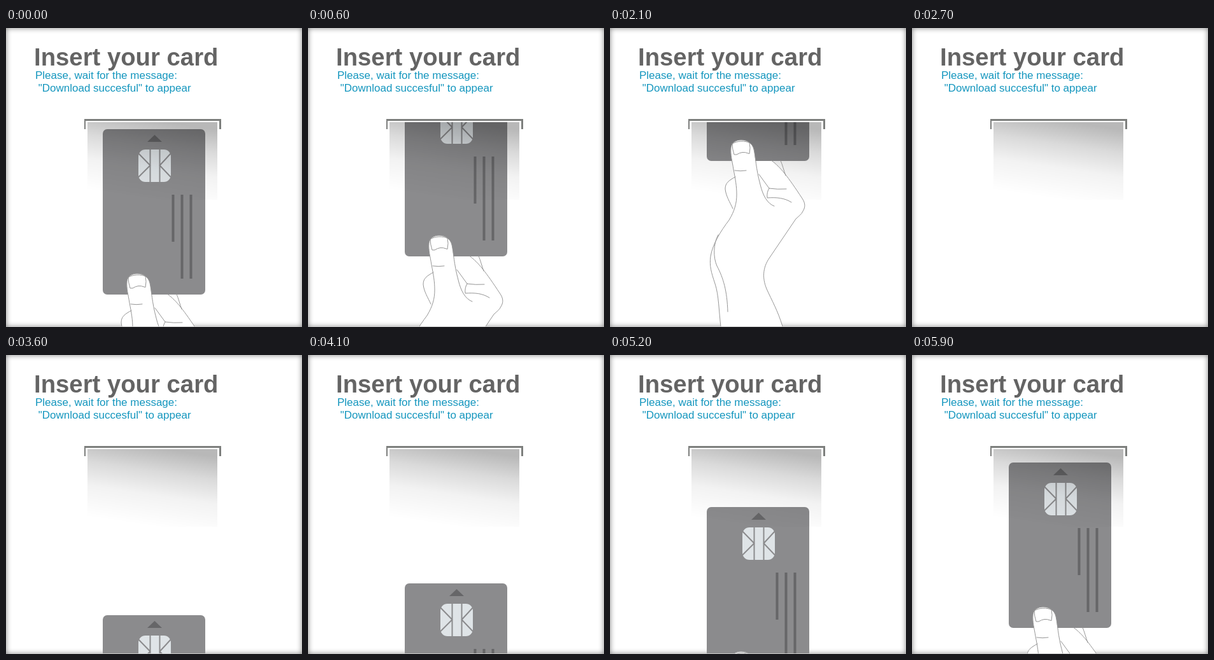
Animation, 465 px wide and 470 px high, one loop 6 s. Source, as an HTML page:

```html
<!DOCTYPE html>
<html lang="en">
<head>
<meta charset="utf-8">
<title>Insert your card</title>
<style>
  html, body { margin: 0; width: 100%; height: 100%; overflow: hidden; background: #fff; }
  .stage { position: relative; width: 465px; height: 470px; overflow: hidden; }
  .edge { position: absolute; inset: 0; box-shadow: inset 0 0 8px rgba(0, 0, 0, .5); }
  svg { position: absolute; left: 0; top: 0; display: block; }
  text { font-family: "Liberation Sans", Arial, sans-serif; white-space: pre; }
  .title { font-size: 38.3px; font-weight: bold; fill: #646464; }
  .note { font-size: 17px; fill: #1496be; }

  .move { animation: slide 6s -2ms infinite; }
  /* In by 10px steps, a blank pause, then a rise from below. */
  @keyframes slide {
    0%      { transform: translateY(0); animation-timing-function: steps(27); }
    45%     { transform: translateY(-270px); animation-timing-function: step-end; }
    45.001% { transform: translateY(330px); animation-timing-function: step-end; }
    53.333% { transform: translateY(290px); animation-timing-function: steps(17); }
    81.666% { transform: translateY(120px); animation-timing-function: step-end; }
    81.667% { transform: translateY(110px); animation-timing-function: steps(11); }
    100%    { transform: translateY(0); }
  }

  .body { fill: #8b8b8d; }
  .dark { fill: #666668; }
  .chip { fill: #dfe4e7; }
  .cuts { fill: none; stroke: #8b8b8d; stroke-width: 2; }
  .skin { fill: #fff; }
  .line { fill: none; stroke: #959595; stroke-width: 1; stroke-linecap: round; stroke-linejoin: round; }
  .slot { fill: #7d7f7d; }
</style>
</head>
<body>
<div class="stage">
  <div class="edge"></div>
  <svg width="465" height="470" viewBox="0 0 465 470">
    <defs>
      <clipPath id="cardArea"><rect x="0" y="148" width="465" height="321"/></clipPath>
      <clipPath id="handArea"><rect x="0" y="143" width="465" height="326"/></clipPath>
      <linearGradient id="shade" gradientUnits="userSpaceOnUse" x1="238" y1="146" x2="220" y2="268">
        <stop offset="0" stop-opacity=".28"/>
        <stop offset=".3" stop-opacity=".145"/>
        <stop offset=".6" stop-opacity=".05"/>
        <stop offset="1" stop-opacity="0"/>
      </linearGradient>
    </defs>

    <text class="title" x="44" y="59">Insert your card</text>
    <text class="note" x="46" y="80">Please, wait for the message:</text>
    <text class="note" x="46" y="100" xml:space="preserve"> "Download succesful" to appear</text>

    <path class="slot" d="M123 143H338V159H335V146H125V159H123Z"/>

    <g clip-path="url(#cardArea)">
      <g class="move">
        <rect class="body" x="152" y="159" width="161" height="260" rx="7"/>
        <path class="dark" d="M222 179L233.5 168L245 179Z"/>
        <rect class="chip" x="208" y="191" width="51" height="51" rx="11"/>
        <path class="cuts" d="M226.5 191V242M241.5 191V242M208 197L226.5 216L208 234.5M259 197L241.5 216L259 234.5"/>
        <path class="dark" d="M260.500 262h4v74h-4zM274.500 262h4v132h-4zM288.500 262h4v132h-4z"/>
      </g>
    </g>

    <rect x="128" y="148" width="204" height="122" fill="url(#shade)"/>

    <g clip-path="url(#handArea)">
      <g class="move">
        <g transform="translate(0 210)">
          <path class="skin" d="M197 234C186 240 181 244 181 253C182 264 188 273 193 284L199 262Z"/>
          <path class="skin" d="M254 209C268 219 279 233 302 268C308 277 306 283 303 288C301 293 296 296 292 300L250 362C240 377 239 393 246 410C254 428 264 445 271 469L285 525H180L174 469C171 445 171 420 165 402C159 384 156 374 158 359C161 340 174 319 187 302C196 287 199 275 199 262C199 248 196 235 193 215L192 209Z"/>
          <path class="skin" d="M194 222C191 206 189 198 190 188C191 180 198 176 206 176C216 176 224 182 226 191C228 202 229 218 234 234L199 250Z"/>

          <g class="line">
            <path d="M197 234C186 240 181 244 181 253C182 264 188 273 193 284"/>
            <path d="M258 280C247 276 240 263 236 246C229 220 229 204 226 191C224 182 216 176 206 176C198 176 191 180 190 188C189 200 192 209 194 222C197 238 199 248 199 262C199 275 196 287 187 302C174 319 161 340 158 359C156 374 159 384 165 402C171 420 171 445 174 469L180 525"/>
            <path d="M170 325C162 339 162 361 168 374C178 393 184 413 185 446"/>
            <path d="M254 208.500C268 219 279 233 302 268C308 277 306 283 303 288C301 293 296 296 292 300L250 362C240 377 239 393 246 410C254 428 264 445 271 469L285 525"/>
            <path d="M268 208.500C271 215 273 224 276 232"/>
            <path d="M234 230L250 252Q263 254 277 253M250 252Q246 258 247 267C262 266 274 267 285 274"/>
            <path d="M196 224Q205 225.500 214 224"/>
            <path d="M192 182C199 177 213 177 219 180.500Q221 188 219 197.500L217 197Q208 193 199 199L195 199Q192 190 192 182Z"/>
          </g>
        </g>
      </g>
    </g>
  </svg>
</div>
</body>
</html>
```
